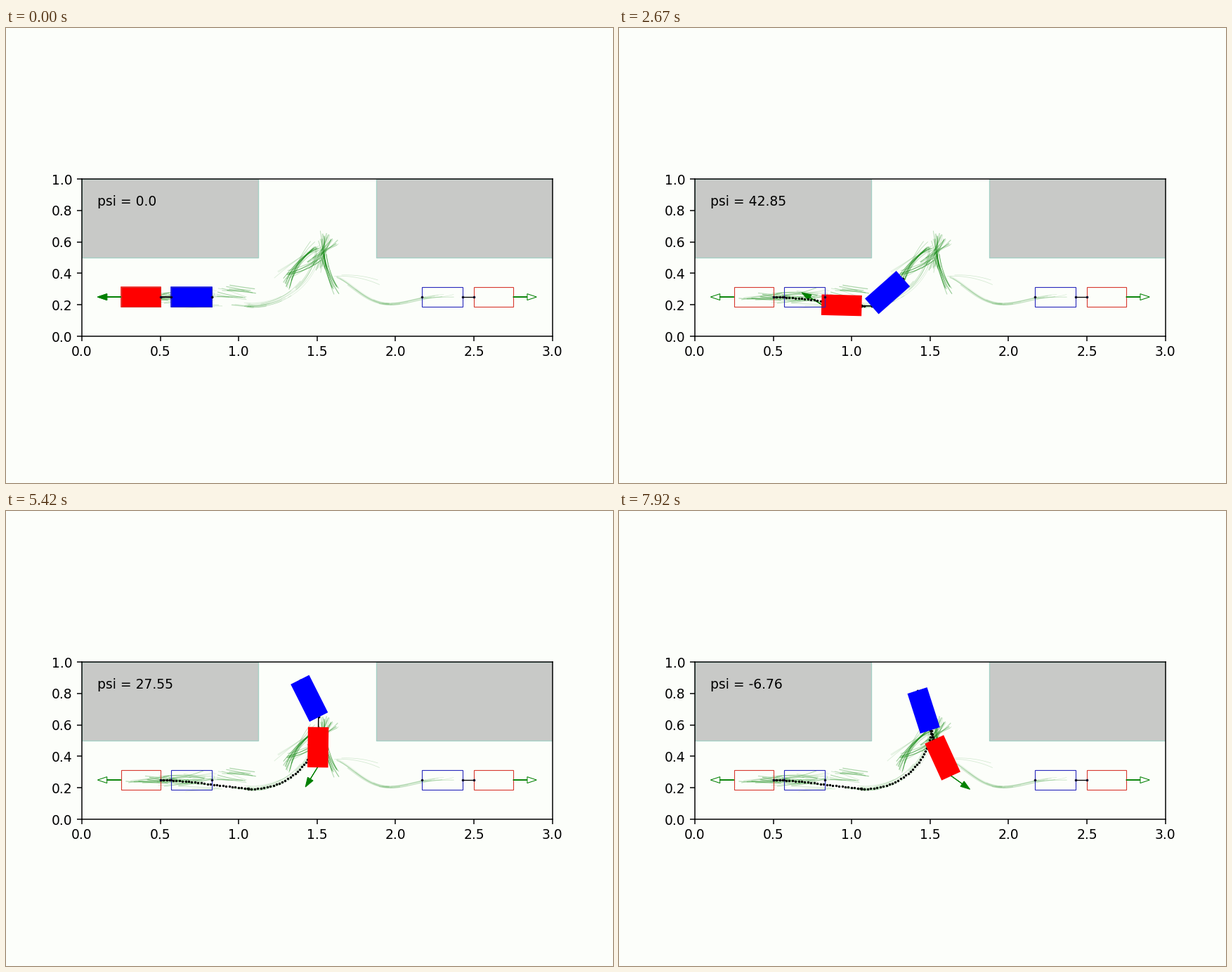
A matplotlib script that plays this animation: 864 by 648 pixels, repeating every 8000 ms.

```python
import numpy as np
import matplotlib.pyplot as plt
from matplotlib.animation import FuncAnimation
from matplotlib.collections import LineCollection
from matplotlib.patches import FancyArrow, Polygon, Rectangle

TICKS, TICK_MS = 160, 50        # 12 poses per second, drawn on a 50 ms clock
PAPER, WALL, WALL_EDGE = "#fcfefa", "#c8c9c7", "#a4d0c6"
TRUCK, BAR, TRAILER, WIDTH = 0.25, 0.07, 0.26, 0.125
STEP, SUB = 0.02, 8
rng = np.random.default_rng(4)


def unit(a):
    return np.array([np.cos(a), np.sin(a)])


# --- motion -----------------------------------------------------------------
# Each leg: end pose (x, y, truck angle, psi), then runs of
# (steps, +1 reverse / -1 forward, curvature).
LEGS = [
    ((0.781, 0.228, -6.2, 16.80), [(10, 1, -0.6), (4, 1, 0.2)]),
    ((0.998, 0.203, -6.2, 39.86), [(11, 1, 0.2)]),
    ((1.221, 0.216, 18.8, 41.96), [(4, 1, 0.3), (2, -1, -0.5), (9, 1, 2.25)]),
    ((1.508, 0.583, 89.2, 27.55), [(25, 1, 2.4)]),
    ((1.525, 0.465, 103.3, 3.91), [(4, 1, 1.2), (10, -1, -0.9)]),
    ((1.528, 0.505, 114.6, -6.76), [(9, 1, -0.7), (7, -1, -2.3)]),
]


def advance(pose, way, bend):
    """Move a truck and its trailer by one step without side slip."""
    x, y, a, psi = pose
    ds = way * STEP / SUB
    for _ in range(SUB):
        swing = (np.sin(psi) - BAR * bend * np.cos(psi)) / TRAILER
        mid = a + bend * ds / 2
        x += ds * np.cos(mid)
        y += ds * np.sin(mid)
        a += bend * ds
        psi += (swing - bend) * ds
    return np.array([x, y, a, psi])


def drive():
    """Poses and steering angles; each leg is eased onto its end pose."""
    poses, steer = [np.array([0.5, 0.25, 0.0, 0.0])], [0.0]
    for (x, y, a, psi), runs in LEGS:
        leg = [poses[-1]]
        for count, way, bend in runs:
            for _ in range(count):
                leg.append(advance(leg[-1], way, bend))
                steer.append(-np.arctan(bend * TRUCK))
        miss = np.array([x, y, np.radians(a), np.radians(psi)]) - leg[-1]
        n = len(leg) - 1
        poses += [leg[i] + miss * i / n for i in range(1, n + 1)]
    return np.array(poses), np.array(steer)


POSES, STEER = drive()


# --- search tree ------------------------------------------------------------
lines, shades, widths = [], [], []


def strand(pts, alpha):
    lines.append(pts)
    shades.append((0, 0.5, 0, alpha * rng.uniform(0.5, 1.4)))
    widths.append(rng.uniform(0.3, 0.7))


def spray(count, x, y, heading, bend, length, alpha, dx=0.015, dy=0.015,
          fan=0.1):
    """Random arcs around a middle point and a heading."""
    s = np.linspace(-0.5, 0.5, 16)
    for _ in range(count):
        size = length * rng.uniform(0.7, 1.1)
        k = rng.normal(bend, 0.6) * size
        a = rng.normal(heading, fan) + k * s
        pts = np.cumsum(unit(a).T, axis=0) * size / len(s)
        mid = rng.uniform(-1, 1, 2) * (dx, dy) + (x, y)
        strand(pts - pts[8] + mid, alpha)


def follow(count, curve, length, drift, alpha):
    """Random pieces of a curve, each pushed a little off it."""
    for _ in range(count):
        i = rng.integers(0, len(curve) - length)
        strand(curve[i:i + length] + rng.normal(0, drift, 2), alpha)


def grow_tree():
    spray(22, 0.56, 0.25, 0, 0, 0.26, 0.3, dx=0.15, dy=0.03)
    spray(12, 0.78, 0.23, 0, 0, 0.26, 0.17, dx=0.1, dy=0.06)
    spray(10, 0.98, 0.28, -0.12, 0, 0.2, 0.28, dx=0.06, dy=0.035)
    follow(18, POSES[22:66, :2], 16, 0.014, 0.16)
    spray(13, 1.39, 0.47, 0.95, -2, 0.36, 0.35)
    spray(7, 1.43, 0.44, 0.4, 1.5, 0.3, 0.35)
    spray(3, 1.33, 0.46, 0.6, 0, 0.28, 0.12)
    spray(9, 1.57, 0.41, 1.9, -1.2, 0.29, 0.55, fan=0.05)
    spray(24, 1.54, 0.54, 1.35, 0.4, 0.25, 0.3, fan=0.4)
    u = np.linspace(0, 0.77, 40)
    sway = 0.25 + 0.13 * np.exp(-3 * u) * np.cos(8 * u)
    follow(12, np.column_stack([1.62 + u, sway]), 18, 0.006, 0.13)
    spray(2, 1.78, 0.37, -0.2, -1.3, 0.3, 0.22)
    spray(2, 2.28, 0.25, 0.05, 0, 0.24, 0.3, dy=0.004, fan=0.02)
    ax.add_collection(LineCollection(lines, colors=shades, linewidths=widths,
                                     zorder=1.5))


# --- vehicle ----------------------------------------------------------------
def box(start, angle, length):
    along, side = unit(angle) * length, unit(angle + np.pi / 2) * WIDTH / 2
    return np.array([start - side, start + along - side,
                     start + along + side, start + side])


def layout(pose):
    """Corner points of both bodies, the nose and the three joints."""
    x, y, a, psi = pose
    axle = np.array([x, y])
    hitch = axle + BAR * unit(a)
    tail = hitch + TRAILER * unit(a + psi)
    nose = axle - TRUCK * unit(a)
    return (box(nose, a, TRUCK), box(hitch, a + psi, TRAILER),
            nose, np.array([axle, hitch, tail]))


def make_arrow(nose, angle, z, filled):
    dx, dy = 0.15 * unit(angle)
    arrow = FancyArrow(*nose, dx, dy, width=0.001, head_width=0.04,
                       head_length=0.06, length_includes_head=True,
                       fill=filled, fc="g", ec="g", lw=0.55, zorder=z)
    return ax.add_patch(arrow)


def outline(pose):
    red, blue, nose, joints = layout(pose)
    ax.add_patch(Polygon(red, fill=False, ec="#d83a30", lw=0.6, zorder=7))
    ax.add_patch(Polygon(blue, fill=False, ec="#2a2abc", lw=0.6, zorder=7))
    make_arrow(nose, pose[2] + np.pi, 7, False)
    ax.plot(*joints[:2].T, color="k", lw=0.7, zorder=7)
    ax.plot(*joints.T, "o", color="#0a0a28", ms=1.9, mew=0, zorder=8)


# --- scene ------------------------------------------------------------------
plt.rcParams["font.family"] = "DejaVu Sans"
fig = plt.figure(figsize=(6.4, 4.8), dpi=135, facecolor=PAPER)
ax = fig.add_axes([0.125, 0.3225, 0.775, 0.3454], facecolor=PAPER)
ax.set(xlim=(0, 3), ylim=(0, 1), xticks=np.arange(0, 3.1, 0.5),
       yticks=np.linspace(0, 1, 6))

for left in (0, 1.875):
    ax.add_patch(Rectangle((left, 0.5), 1.125, 0.5, fc=WALL, ec=WALL_EDGE,
                           lw=0.7, zorder=1))
grow_tree()
outline((0.5, 0.25, 0, 0))
outline((2.5, 0.25, np.pi, 0))

label = ax.text(0.1, 0.832, "", fontsize=10, color="k", zorder=9)
arrow = make_arrow((0.25, 0.25), np.pi, 3, True)
trail, = ax.plot([], [], "ko", ms=1.8, mew=0, zorder=4)
bar, = ax.plot([], [], color="k", lw=0.8, zorder=4)
joint_dots, = ax.plot([], [], "ko", ms=2.0, mew=0, zorder=4)
red, blue = (ax.add_patch(Polygon(np.zeros((4, 2)), fc=c, ec=c, lw=0.8,
                                  zorder=5)) for c in "rb")


def draw(tick):
    i = (3 * tick + 2) // 5
    pose = POSES[i]
    red_xy, blue_xy, nose, joints = layout(pose)
    red.set_xy(red_xy)
    blue.set_xy(blue_xy)
    bar.set_data(*joints[:2].T)
    joint_dots.set_data(*joints.T)
    trail.set_data(*POSES[:i + 1, :2].T)
    dx, dy = 0.15 * unit(pose[2] + np.pi + STEER[i])
    arrow.set_data(x=nose[0], y=nose[1], dx=dx, dy=dy)
    label.set_text(f"psi = {round(float(np.degrees(pose[3])), 2)}")
    return red, blue, bar, joint_dots, trail, arrow, label


anim = FuncAnimation(fig, draw, frames=TICKS, init_func=lambda: draw(0),
                     interval=TICK_MS, repeat=True, repeat_delay=0)
plt.show()
```
